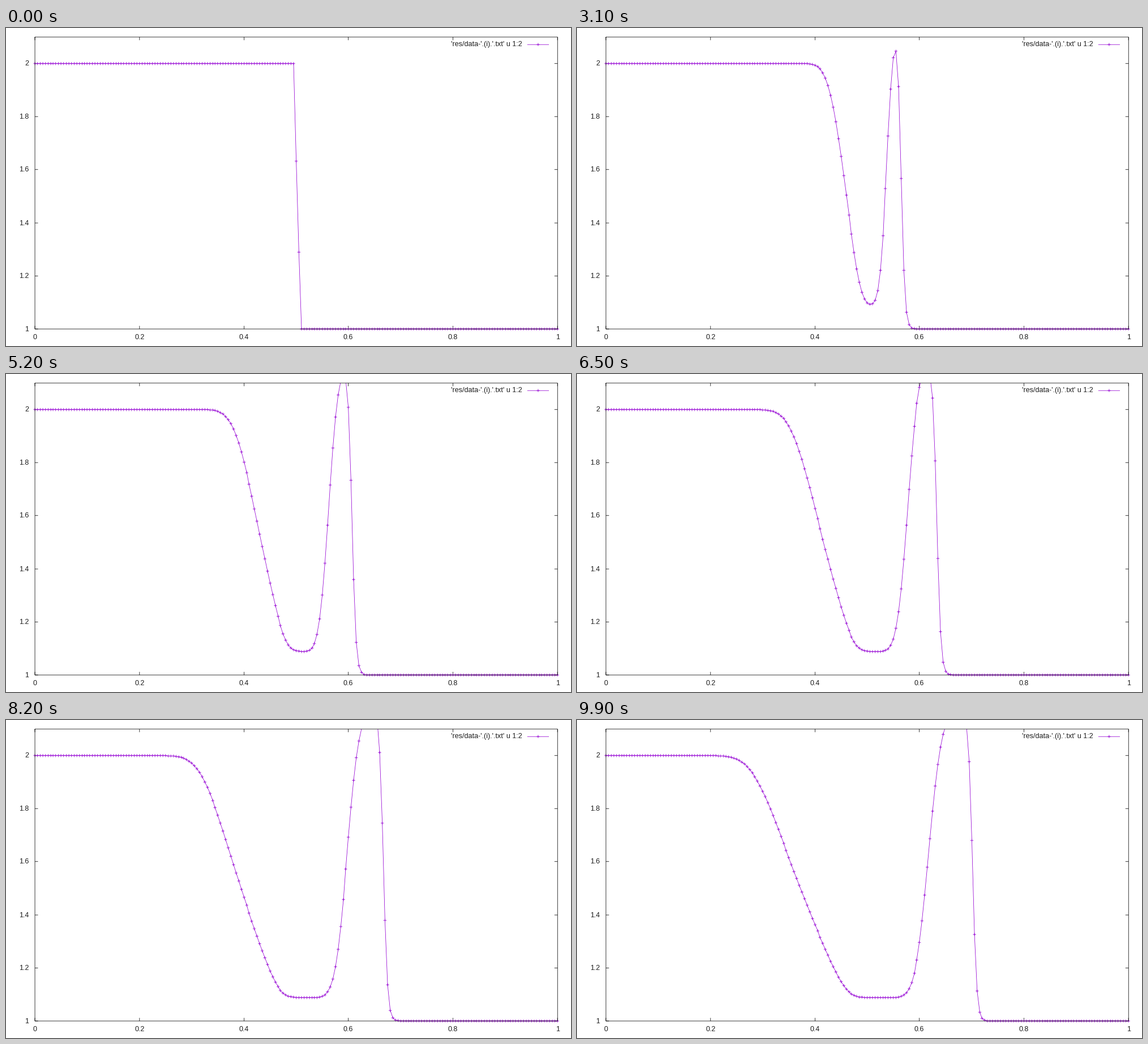
A matplotlib script that plays this animation: 998 by 561 pixels, repeating every 10 s.

```python
import math

import matplotlib.pyplot as plt
import numpy as np
from matplotlib.animation import FuncAnimation
from matplotlib.patches import Rectangle

W, H, DPI = 998, 561, 64
PLOT_W, PLOT_H = 1280, 720         # drawing grid, scaled down to the stage
UNIT = 72 / DPI * W / PLOT_W       # one grid unit in points
LEFT, RIGHT, TOP, BOTTOM = 65, 1249, 20, 681
PURPLE = "#9400d3"
FRAMES = 100

plt.rcParams["font.family"] = "Liberation Sans"
plt.rcParams["path.simplify"] = False

fine = np.linspace(0, 1, 2001)
grid = fine[::10]
start = np.interp(grid, [0.495, 0.5, 0.505, 0.51], [2, 1.633, 1.29, 1])
erf = np.vectorize(math.erf)


def cdf(z):
    return 0.5 * (1 + erf(z / math.sqrt(2)))


def gx(x):
    return np.floor(LEFT + (RIGHT - LEFT) * np.asarray(x) + 0.5) + 0.5


def gy(y):
    return np.floor(BOTTOM - (BOTTOM - TOP) * (np.asarray(y) - 1) / 1.1 + 0.5) + 0.5


def rarefaction(n):
    """Share of the density drop reached at each grid point."""
    settle = 1 - math.exp(-n / 6)
    head, foot = 0.5018 - 0.00219 * n, 0.5025 - 0.0004 * n
    s_head = math.sqrt(9.0e-6 * n + 6.6e-5 * settle + 1e-6)
    s_foot = math.sqrt(2.4e-6 * n + 3.4e-5 * settle + 1e-6)
    tilt = np.clip(1.55 - 0.55 * (fine - head) / (foot - head), 0.6, 2.2)
    slope = tilt * cdf((fine - head) / s_head) * cdf((foot - fine) / s_foot)
    total = np.cumsum(slope) - slope / 2
    return (total / slope.sum())[::10]


def density(n):
    """Shock tube: rarefaction to the left, contact and shock to the right."""
    s = math.sqrt(4.15e-6 * n - 1.4e-5 * (1 - math.exp(-n / 8)) + 1e-6)
    contact = cdf((grid - 0.5011 - 0.001174 * n) / s)
    steep = 246 + 1150 / (n + 3)
    shock = 0.5 * (1 - np.tanh(steep * (grid - 0.5026 - 0.002007 * n) / 2))
    rho = 1 + (1 - 0.912 * rarefaction(n) + 1.082 * contact) * shock
    return rho + (start - rho) * math.exp(-n / 1.6)


def pluses(x, y):
    """Plus signs, seven units wide, as one broken polyline."""
    gap = np.full_like(x, np.nan)
    xs = np.stack([x - 3.5, x + 3.5, gap, x, x, gap], axis=1)
    ys = np.stack([y, y, gap, y - 3.5, y + 3.5, gap], axis=1)
    return xs.ravel(), ys.ravel()


fig = plt.figure(figsize=(W / DPI, H / DPI), dpi=DPI, facecolor="white")
ax = fig.add_axes([0, 0, 1, 1])
ax.set_xlim(0, PLOT_W)
ax.set_ylim(PLOT_H, 0)
ax.axis("off")


def stroke(x, y, color="black", z=1):
    line, = ax.plot(x, y, color=color, lw=UNIT, snap=False, zorder=z,
                    solid_capstyle="butt", solid_joinstyle="miter")
    return line


def label(x, y, s, ha):
    ax.text(x, y, s, ha=ha, va="baseline", fontsize=16 * UNIT, color="#1c1c1c")


L, R, T, B = LEFT + 0.5, RIGHT + 0.5, TOP + 0.5, BOTTOM + 0.5
stroke([L, R, R, L, L, L], [T, T, B, B, T, T + 1], z=4)

for k in range(6):
    x, y = gx(k / 5), gy(1 + k / 5)
    stroke([x, x], [B, B - 7])
    stroke([x, x], [T, T + 7])
    stroke([L, L + 7], [y, y])
    stroke([R, R - 7], [y, y])
    label(x, 704.5, f"{k / 5:g}", "center")
    label(52, y + 4.8, f"{1 + k / 5:g}", "right")

label(1169, 41, "'res/data-'.(i).'.txt' u 1:2", "right")
stroke([1181, 1230], [37.5, 37.5], PURPLE)
stroke(*pluses(np.array([1205.5]), np.array([37.5])), PURPLE)

curve = stroke([], [], PURPLE, 2)
curve.set_clip_path(Rectangle((LEFT, TOP), RIGHT - LEFT + 1, BOTTOM - TOP + 1,
                              transform=ax.transData))
marks = stroke([], [], PURPLE, 3)
marks.set_clip_on(False)
cols = gx(grid)


def update(n):
    rows = gy(density(n))
    curve.set_data(cols, rows)
    seen = rows >= T
    marks.set_data(*pluses(cols[seen], rows[seen]))
    return curve, marks


anim = FuncAnimation(fig, update, frames=FRAMES, interval=100,
                     repeat=True, repeat_delay=0, blit=False)
plt.show()
```
